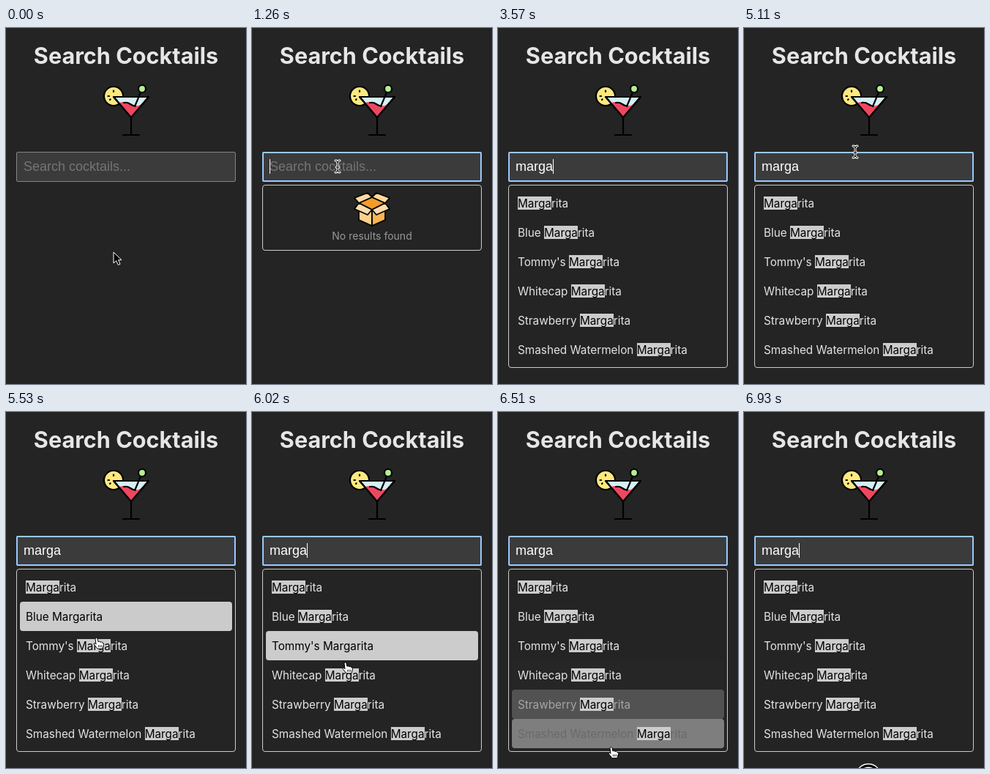
Animation of 328 by 486 pixels, one loop 7000 ms. Source, as an HTML page:

```html
<!DOCTYPE html>
<html lang="en">
<head>
<meta charset="utf-8">
<title>Search Cocktails</title>
<style>
  html, body { margin: 0; width: 100%; height: 100%; overflow: hidden; background: #242424; }
  body { position: relative; color: #e4e4e4; font: 15.3px Inter, sans-serif; }
  body * { box-sizing: border-box; }
  h1 { position: absolute; top: 18px; width: 328px; margin: 0; text-align: center; font-size: 30.6px; line-height: 40px; color: #e6e6e6; }
  svg { position: absolute; left: 0; top: 0; overflow: hidden; }
  .ink { stroke: #000; stroke-width: 2.2; stroke-linejoin: round; stroke-linecap: round; }
  #empty .ink { stroke-width: 1.8; }
  #field { position: absolute; left: 14px; top: 169px; width: 300px; height: 41px; padding-left: 9px; border: 1px solid #858585; border-radius: 2px; background: #3b3b3b; color: #fff; font: 18px/38px "Liberation Sans", Arial, sans-serif; white-space: pre; }
  #field.focus { outline: 2px solid #99c8ff; outline-offset: -2px; }
  #caret { display: inline-block; width: 1px; height: 20px; margin-right: -1px; vertical-align: -4px; background: #fff; }
  #hint { color: #757575; }
  #panel { position: absolute; left: 14px; top: 214px; width: 300px; border: 1px solid #ccc; border-radius: 4px; }
  #empty p { position: absolute; top: 59px; width: 100%; margin: 0; text-align: center; font-size: 14px; line-height: 20px; color: #999; }
  #list { padding: 4px; }
  .row { height: 40px; padding-left: 8px; border-radius: 4px; line-height: 42px; white-space: pre; }
  mark { background: linear-gradient(#ccc 0 0) 0 0 / 100% 18px no-repeat; color: #000; }
</style>
</head>
<body>
<h1>Search Cocktails</h1>

<svg width="328" height="160">
  <g class="ink">
    <circle cx="147" cy="93" r="13" fill="#fde880"/>
    <path d="M147 85.5v1.5M139.5 93h1.5M142 98l.6-.6" fill="none"/>
    <path d="M147 94H195L171 122Z" fill="#d3f1f6"/>
    <path d="M155 102Q163 99 170 104T185 104L171 121Z" fill="#ef4760" stroke="none"/>
    <path d="M161 102Q166 101 170 104T177 106M184 88L176 107M171 122V146M160 146H182" fill="none"/>
    <path d="M147 94H195L171 122Z" fill="none"/>
    <circle cx="186" cy="83" r="5" fill="#b5ef92"/>
  </g>
</svg>

<div id="field"><span id="typed"></span><i id="caret"></i><span id="hint">Search cocktails...</span></div>

<div id="panel">
  <div id="empty">
    <svg width="298" height="60" viewBox="15 215 298 60">
      <g class="ink">
        <path d="M146 240V262L164 270V248Z" fill="#fdd08c"/>
        <path d="M182 240V262L164 270V248Z" fill="#f9b453"/>
        <path d="M146 239L164 231L182 239L164 248Z" fill="#f29c2b"/>
        <path d="M146 239L164 231L158 225L140 232ZM182 239L164 231L170 225L188 232Z" fill="#fdd99f"/>
        <path d="M146 239L164 248L158 255L140 247ZM182 239L164 248L170 255L188 247Z" fill="#fddcaa"/>
        <path d="M164 262V266"/>
      </g>
    </svg>
    <p>No results found</p>
  </div>
  <svg id="spinner" width="40" height="38" viewBox="15 215 40 38">
    <circle id="arc" cx="34.5" cy="234" r="8.8" fill="none" stroke="#c8c8c8" stroke-width="4" pathLength="360" stroke-dasharray="270 90"/>
  </svg>
  <div id="list"></div>
</div>

<svg id="pointer" width="328" height="486">
  <g id="arrow"><path d="M0 0V15L3.7 11.7L6.3 17.5L9 16.3L6.5 10.7H11Z" fill="#000" stroke="#fff"/></g>
  <g id="beam" fill="none" stroke-linecap="round">
    <path d="M-3 -8Q0 -8 0 -5Q0 -8 3 -8M0 -5V5M-3 8Q0 8 0 5Q0 8 3 8M-2 1H2" stroke="#fff" stroke-width="3"/>
    <path d="M-3 -8Q0 -8 0 -5Q0 -8 3 -8M0 -5V5M-3 8Q0 8 0 5Q0 8 3 8M-2 1H2" stroke="#000"/>
  </g>
  <g id="hand">
    <path d="M-2 1Q-.5 -1 1 1L2 5.5L3.5 5L5 6L6.5 5.7L8 7L9 7.2Q10 9 9 11L8 15H1L-3 10Q-5 7 -2.5 7.5L-1 9Z" fill="#fff" stroke="#000" stroke-linejoin="round"/>
    <path d="M2.5 10V13M4.5 10V13M6.5 10V13" stroke="#000" stroke-width=".8"/>
  </g>
  <g id="ring">
    <circle cx="170" cy="498" r="17.5" fill="#000" stroke="#fff" stroke-width="1.3"/>
    <circle cx="170" cy="498" r="12.5" fill="none" stroke="#fff" stroke-width="2"/>
  </g>
</svg>

<script>
const $ = id => document.getElementById(id);
const LOOP = 7000, FADE = 150;
const drinks = ["", "Blue ", "Tommy's ", "Whitecap ", "Strawberry ", "Smashed Watermelon "];
const hoverAt = [5300, 5390, 5540, 6262, 6375, 6440, 6490];
const keyTimes = [2030, 2100, 2240, 2380, 2520];
const path = [
  [40, 147, 306], [280, 88, 255], [420, 98, 208], [560, 117, 189],
  [4880, 117, 189], [5110, 152, 169], [5180, 152, 169], [5390, 134, 259],
  [5530, 124, 308], [5740, 121, 338], [5970, 121, 338], [6160, 147, 352],
  [6240, 147, 352], [6370, 149, 407], [6630, 160, 500]
];

$("list").innerHTML = drinks.map(d => `<div class="row">${d}<mark>Marga</mark>rita</div>`).join("");
const rows = [...document.querySelectorAll(".row")];

const clamp = v => Math.max(0, Math.min(1, v));
const ease = v => 1 - (1 - clamp(v)) ** 2;
const show = (id, on) => $(id).style.display = on ? "" : "none";

function pointAt(t) {
  const i = path.findIndex(p => p[0] > t);
  if (i === 0) return path[0].slice(1);
  if (i < 0) return path.at(-1).slice(1);
  const [t0, x0, y0] = path[i - 1], [t1, x1, y1] = path[i];
  const k = (t - t0) / (t1 - t0);
  return [x0 + (x1 - x0) * k, y0 + (y1 - y0) * k];
}

function caretOn(t) {
  if (t < 910) return false;
  if (t < 2030) return t < 1680;
  return t < 3060 || Math.floor((t - 3060) / 496) % 2 === 1;
}

function drawField(t) {
  const count = keyTimes.filter(k => t >= k).length;
  $("field").classList.toggle("focus", t >= 910);
  $("typed").textContent = "marga".slice(0, count);
  $("caret").style.visibility = caretOn(t) ? "visible" : "hidden";
  show("hint", !count);
}

function drawPanel(t) {
  const stage = t < 2800 ? "empty" : t < 3360 ? "spinner" : "list";
  for (const id of ["empty", "spinner", "list"]) show(id, id === stage);
  $("panel").style.height = { empty: 90, spinner: 40, list: 250 }[stage] + "px";
  $("panel").style.opacity = clamp((t - 910) / 300);
  $("arc").setAttribute("transform", `rotate(${-128 + (t - 2800) * 0.36} 34.5 234)`);
  rows.forEach((row, i) => {
    const a = ease((t - hoverAt[i]) / FADE) * (1 - ease((t - hoverAt[i + 1]) / FADE));
    const tone = 228 * (1 - a);
    row.style.background = `rgba(204,204,204,${a})`;
    row.style.color = `rgb(${tone},${tone},${tone})`;
  });
}

function drawPointer(t) {
  const [x, y] = pointAt(t);
  const kind = t >= 2030 && t < 4900 ? "" :
    y >= 168 && y <= 210 ? "beam" :
    t > 5180 && y > 218 && y < 460 ? "hand" : "arrow";
  for (const id of ["arrow", "beam", "hand"]) {
    show(id, id === kind);
    $(id).setAttribute("transform", `translate(${x} ${y})`);
  }
  show("ring", t >= 6930);
}

const start = performance.now();
function frame() {
  const t = (performance.now() - start) % LOOP;
  drawField(t);
  drawPanel(t);
  drawPointer(t);
  requestAnimationFrame(frame);
}
frame();
</script>
</body>
</html>
```
